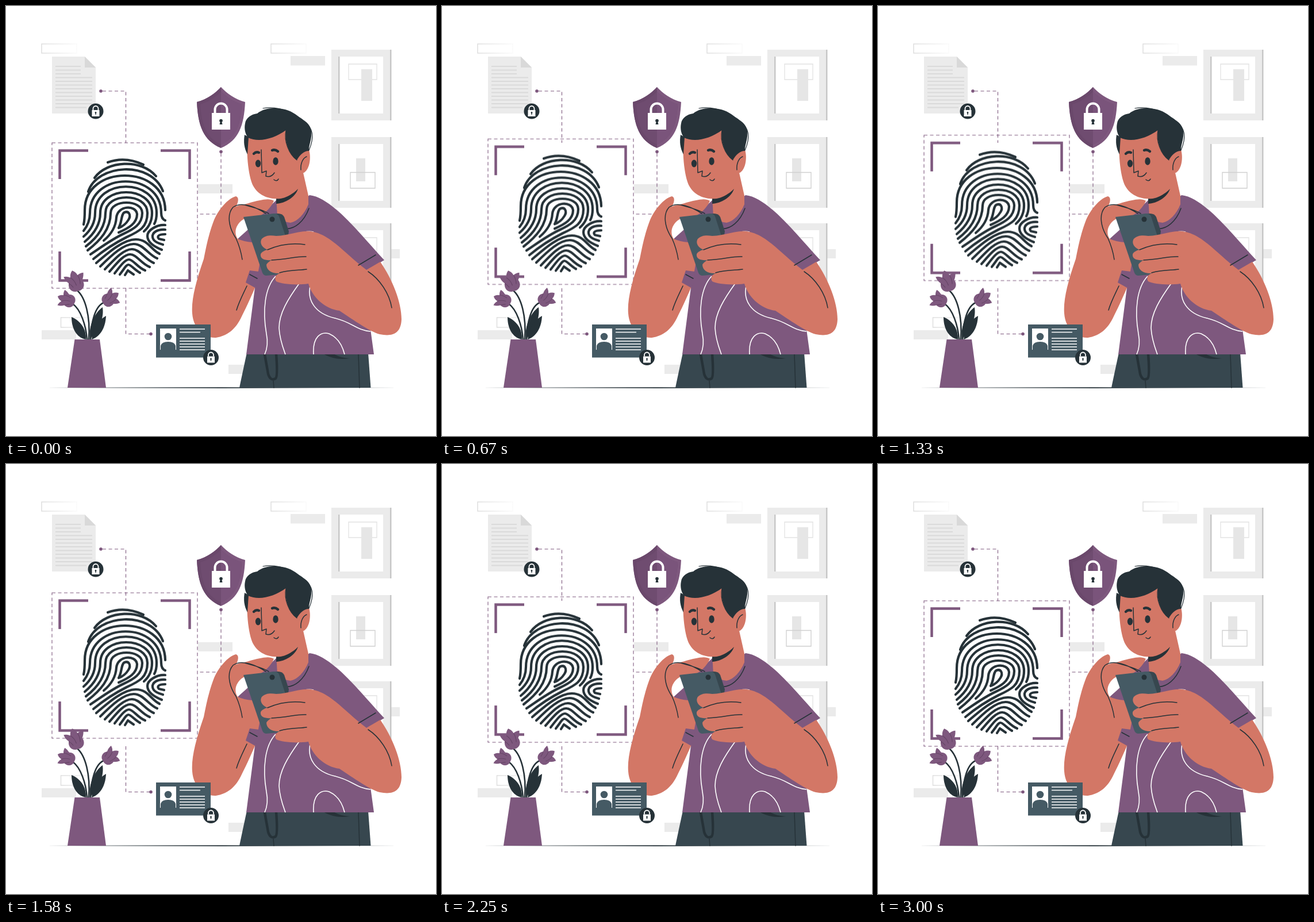
Write an HTML page without scripts that moves like this. It is 748 px wide and 748 px high and loops after 3.04 s.

```html
<!DOCTYPE html>
<html lang="en">
<head>
<meta charset="utf-8">
<title>Fingerprint security</title>
<style>
html, body { margin: 0; width: 100%; height: 100%; overflow: hidden; background: #fff; }
svg { display: block; width: 100vw; height: 100vh; }
.purple { fill: #7e587e; }
.dark { fill: #263238; }
.slate { fill: #37474f; }
.steel { fill: #455a64; }
.skin { fill: #d37766; }
.pale { fill: #ebebeb; }
.white { fill: #fff; }
.line { fill: none; stroke: #263238; stroke-width: 1.5; stroke-linecap: round; stroke-linejoin: round; }
.thin { stroke-width: 1.2; }
.stem { stroke-width: 2.6; }
.bold { stroke-width: 4.4; }
.wave { fill: none; stroke: #fff; stroke-width: 1.6; }
.dash { fill: none; stroke: #7e587e; stroke-width: 1.1; stroke-dasharray: 6 4.5; }
.corner { fill: none; stroke: #7e587e; stroke-width: 4.5; }
.ridge { fill: none; stroke: #263238; stroke-width: 4.2; stroke-linecap: round; stroke-linejoin: round; }
.fade { fill: none; stroke: url(#fade); stroke-width: 1.5; }
.float { animation: float 3040ms linear infinite; }
@keyframes float {
  0% { transform: translateY(0); }
  48.8% { transform: translateY(-14.9px); }
  96%, 100% { transform: translateY(0); }
}
</style>
</head>
<body>
<svg viewBox="0 0 748 748">
<defs>
  <linearGradient id="fade">
    <stop offset="0" stop-color="#dedede"/>
    <stop offset="1" stop-color="#fafafa"/>
  </linearGradient>
  <g id="frame">
    <path class="pale" d="M566 76H670V199H566Z"/>
    <path fill="#c7c7c7" d="M668 76H670.5V199H668ZM578 88H581V187H578Z"/>
    <path class="white" d="M580.5 88H656V187H580.5Z"/>
  </g>
  <g id="badge">
    <circle class="dark" r="13.5"/>
    <path class="white" d="M-6.5 -2H6.5V9H-6.5Z"/>
    <path fill="none" stroke="#fff" stroke-width="1.8" d="M-4.5 -2V-4.5a4.5 4.5 0 0 1 9 0V-2"/>
    <circle class="dark" cy="2.5" r="1.4"/>
    <path class="dark" d="M-.7 3H.7V6H-.7Z"/>
  </g>
  <g id="flower">
    <path class="purple" d="M-4 0C-13 -2 -15 -11 -12 -17Q-17 -22 -18 -30Q-12 -30 -7 -26Q-6 -33 -1 -37Q5 -33 6 -27Q11 -30 17 -29Q16 -22 12 -17C15 -10 13 -2 4 0Z"/>
    <path fill="none" stroke="#674668" stroke-width="1.2" d="M-12 -17Q-8 -13 -6 -8M-7 -26Q-1 -20 0 -10M6 -27Q9 -20 7 -11"/>
  </g>
</defs>

<!-- room -->
<path class="fade" d="M62 66H123V82H62Z"/>
<path class="fade" d="M461 66H522V82H461Z"/>
<path class="fade" d="M95.5 542H156V559H95.5Z"/>
<path class="pale" d="M495 87H555V103.500H495ZM334 310H394V326H334ZM387 624H447V640H387ZM62 564H122V580H62ZM660 423H685V439H660Z"/>
<use href="#frame"/>
<use href="#frame" y="152"/>
<use href="#frame" y="302"/>
<g fill="none" stroke="#e2e2e2" stroke-width="1.3">
  <path d="M596 101H645V128H596Z"/>
  <path d="M596 403H645V430H596Z"/>
</g>
<path fill="#e6e6e6" d="M618 110H637V165H618ZM609 265H625V305H609Z"/>
<path fill="none" stroke="#cfcfcf" stroke-width="1.3" d="M599 289.500H642V317H599Z"/>

<!-- document -->
<path class="pale" d="M80 88H137L156 107V187H80Z"/>
<path fill="#d9d9d9" d="M137 88L156 107H137Z"/>
<path fill="none" stroke="#dadada" stroke-width="2" d="M86 105H130M86 111.500H130M86 118H130M86 124.500H150M86 131H150M86 137.500H150M86 144H150M86 150.500H150M86 157H150M86 163.500H150M86 170H150M86 176.500H140"/>
<use href="#badge" x="156" y="183"/>

<!-- connectors -->
<path class="dash" d="M168 148H208.500V238M208.500 491V570.500H250M374 256V362H333"/>
<g class="purple">
  <circle cx="165" cy="148" r="2.8"/>
  <circle cx="252" cy="570.500" r="2.8"/>
  <circle cx="374" cy="253.500" r="2.8"/>
</g>

<!-- scanner -->
<g class="float">
  <path class="dash" d="M80 238H333V491H80Z"/>
  <path class="corner" d="M93.500 301V251.500H143M269 251.500H319.500V301M319.500 427V477.500H269M143 477.500H93.500V427"/>
  <g class="ridge">
    <path d="M177 272Q207 261 239 276"/>
    <path d="M154 299C175 269 235 265 261 296"/>
    <path d="M143 323C158 275 252 268 273 322"/>
    <path d="M135 380C137 372 137 362 137 355C137 275 276 275 277 355"/>
    <path d="M135 391C143 381 146 372 146 360C146 287 270 287 270 360C270 366 272 371 277 373"/>
    <path d="M135 401C150 388 155 375 155 360C155 299 262 299 262 360Q262 372 258 379"/>
    <path d="M137 410C155 395 164 378 164 360C164 312 254 312 254 360C254 374 248 385 240 392"/>
    <path d="M139 418C160 402 173 383 173 360C173 324 246 324 246 360C246 385 232 392 210 402C190 412 170 425 152 440"/>
    <path d="M142 425C164 408 182 388 182 360C182 336 237 336 237 360C237 380 222 388 205 396C185 405 165 420 147 432"/>
    <path d="M170 408C182 398 191 385 192 368C194 347 226 345 228 362C228 378 214 386 196 394"/>
    <path d="M196 386C202 376 200 362 206 359C214 356 218 364 213 372C208 380 202 384 196 386"/>
    <path d="M277 381C262 380 246 390 246 400S256 418 271 424"/>
    <path d="M277 389C263 388 254 394 255 402S266 413 273 415"/>
    <path d="M277 397C265 397 262 401 266 405L275 407"/>
    <path d="M157 447C180 427 205 406 226 406S252 424 267 431"/>
    <path d="M164 453C185 432 205 414 222 414S248 433 263 439"/>
    <path d="M172 458C190 439 205 423 219 423S242 441 257 447"/>
    <path d="M180 462C193 447 205 432 216 432S235 448 250 454"/>
    <path d="M189 465C199 452 207 441 214 441S229 455 242 460"/>
    <path d="M198 467C206 457 209 450 213 450S225 460 233 464"/>
    <path d="M207 468L212 460L222 467"/>
  </g>
</g>

<!-- shield -->
<path class="purple" d="M374 141C364 152 350 162 332 167C334 208 343 234 374 247C405 234 414 208 416 167C398 162 384 152 374 141Z"/>
<path fill="#6a486b" d="M374 141C364 152 350 162 332 167C334 208 343 234 374 247Z"/>
<path fill="#6f4c70" d="M374 149C364 159 352 167 338 171C340 206 348 229 374 241C400 229 408 206 410 171C396 167 384 159 374 149Z"/>
<path fill="#7a547b" d="M374 149V241C400 229 408 206 410 171C396 167 384 159 374 149Z"/>
<path class="white" d="M358 186H390V215H358Z"/>
<path fill="none" stroke="#fff" stroke-width="4" d="M363.500 187V180a10.500 10.500 0 0 1 21 0V187"/>
<circle class="dark" cx="374" cy="199.500" r="2.800"/>
<path class="dark" d="M373 200H375L376.500 206H371.500Z"/>

<!-- floor and plant -->
<path class="dark" d="M65 664L375 663.200L686 664L375 664.900Z"/>
<path class="line stem" d="M124 495C138 507 147 540 144 580M116 518C130 528 139 555 141 580M170 516C155 522 148 550 147 580"/>
<g class="dark">
  <path d="M114 541C128 547 140 560 139 580C122 577 114 560 114 541Z"/>
  <path d="M146 580C143 555 155 533 168 524C171 545 161 562 146 580Z"/>
  <path d="M149 580C151 560 160 547 174 539C173 560 164 575 149 580Z"/>
</g>
<use href="#flower" transform="translate(125 496) rotate(-14)"/>
<use href="#flower" transform="translate(119 517) rotate(-66) scale(.85)"/>
<use href="#flower" transform="translate(169 517) rotate(58) scale(.87)"/>
<path class="purple" d="M119.500 580H163L174 664H107Z"/>

<!-- trousers -->
<path class="slate" d="M419 603H630L634.500 664H406Q411 640 419 603Z"/>
<path class="line bold" d="M450 606L456 640Q460 653 469 648Q473 644 470 606"/>
<path class="line" d="M465 652L466 664M613 606L615 664"/>
<path class="dark" d="M552 605Q572 617 598 613Q580 612 570 605Z"/>

<!-- shirt -->
<path class="purple" d="M472 336L403 402L413 470L433 490L418 606H640L633 555L626 461L658 442C620 402 568 333 528 329L500 352Z"/>
<path class="white" d="M413 366L422 388L403 405L396 388Z"/>
<g class="wave">
  <path d="M469 470C450 490 446 530 453 570C456 585 455 595 450 606"/>
  <path d="M512 480C490 510 475 535 475 560C476 580 482 595 486 606"/>
  <path d="M530 483C522 512 538 535 572 543C600 549 612 565 634 566"/>
  <path d="M535 606C533 575 548 566 562 570C578 577 585 590 589 606"/>
  <path d="M508 398Q522 390 535 393M515 349L521 353"/>
</g>

<!-- neck and head -->
<path class="skin" d="M470 330L472 366Q482 376 495 377C508 374 519 362 526 345V330L517 290Z"/>
<path class="line" d="M484 387C502 390 519 374 527 352"/>
<path class="dark" d="M470 335C485 335 500 327 508 318C503 333 486 343 470 344Z"/>
<path class="skin" d="M421 222C417 250 421 296 430 313C440 331 460 337 478 335C495 332 508 320 514 300L516 291C526 288 531 270 528 254L522 225L492 205H425Z"/>
<path class="dark" d="M421 229C416 223 414 213 416 204C417 195 427 188 437 187C452 174 485 175 503 188C516 198 529 203 531 217C533 230 526 243 527 252C518 252 511 259 506 268C494 260 484 238 487 216C466 231 440 238 421 229Z"/>
<path class="dark" d="M415 224L422 228L420 258C414 247 413 236 415 224Z"/>
<path class="line thin" d="M447 178C480 172 508 192 519 202C535 212 536 230 527 251M487 216C483 235 492 258 506 268"/>
<ellipse class="dark" cx="438.500" cy="274" rx="4.700" ry="6.500"/>
<ellipse class="dark" cx="469" cy="270" rx="4.700" ry="6.800"/>
<path class="line bold" d="M431 257Q435 253 440 255M463 251Q468 249 473 253"/>
<path class="line" d="M444 250L445 290L453 287L452 296Q461 299 467 290M466 302Q471 306 474 301M513 285C512 273 517 264 523 262"/>

<!-- tapping arm -->
<path class="skin" d="M400 331C388 334 372 350 362 372C352 398 348 420 344 440C330 480 322 512 324 535C326 562 345 578 365 577C385 574 400 562 410 540C420 520 428 502 434 488L442 445L428 411Q414 410 403 405C396 395 399 380 413 371L440 366C450 361 461 351 466 339C458 333 440 338 425 342C415 346 405 346 400 349C404 342 406 333 400 331Z"/>
<path class="purple" d="M424 460L440 462L438 482L433 490L417 481Z"/>
<path class="line" d="M452 361C435 350 410 339 395 350C384 362 387 385 400 404C405 415 409 428 411 441M419 487C413 500 405 515 401 529M424 467L437 474M415 346C430 350 446 354 457 361"/>

<!-- phone -->
<path class="slate" d="M462 362L473 361Q481 361 484 367L492 392L480 466L455 468Z"/>
<path class="steel" d="M413 367L466 361Q473 361 475 366L486 400L476 467L453 469Q448 469 446 464Z"/>
<circle class="dark" cx="463" cy="371" r="4.500"/>

<!-- holding arm -->
<path class="skin" d="M470 400C490 400 510 390 530 392C565 397 588 430 627 459L651 445C672 475 688 515 688 545C687 572 670 575 650 571C632 566 606 547 580 530C555 527 533 507 526 483C505 486 480 484 470 479C466 473 470 467 476 465C463 466 453 460 453 450C455 446 460 443 462 442C450 443 442 440 443 432C444 428 450 425 455 424C444 420 441 411 445 405C452 398 462 399 470 400Z"/>
<path class="line" d="M455 424C480 413 500 412 520 415M462 442C490 441 505 435 522 436M476 464C495 458 510 460 523 458M630 462C650 475 667 500 671 525M613 451L643 433"/>

<!-- card -->
<path class="steel" d="M261 554H356V611.500H261Z"/>
<path class="white" d="M268 561H296V598H268Z"/>
<circle class="steel" cx="282" cy="575" r="6.300"/>
<path class="steel" d="M269 598V591Q271 584 282 584T295 591V598Z"/>
<path fill="none" stroke="#fff" stroke-width="1.600" d="M302 562H346M302 567.500H338M302 578H346M302 583H346M302 588H346M302 593H346M302 598H346"/>
<use href="#badge" x="356.500" y="611.500"/>
</svg>
</body>
</html>
```
